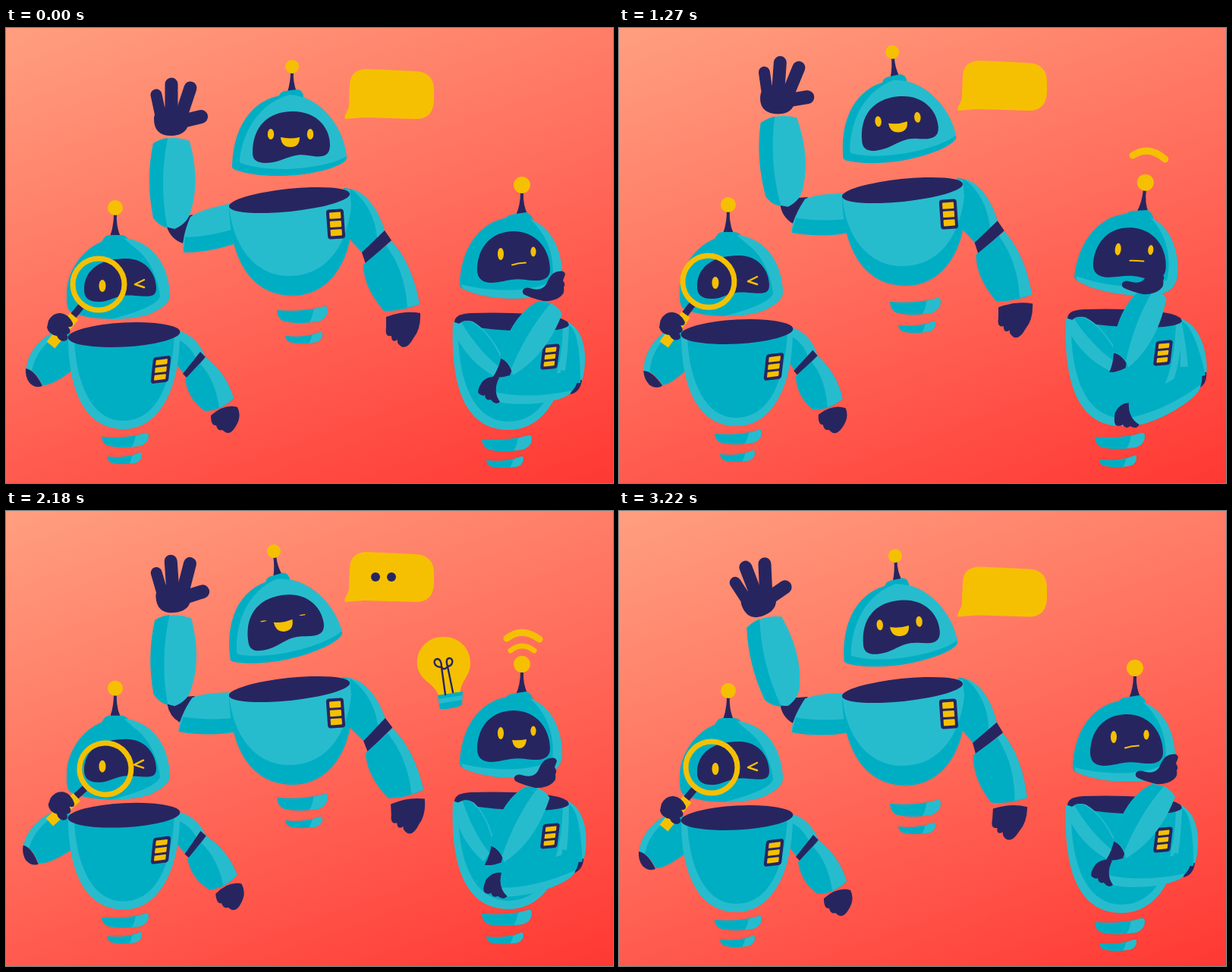
Write an HTML page that moves like this. It is 800 px wide and 600 px high and loops after 3.25 s.

```html
<!DOCTYPE html>
<html lang="en">
<head>
<meta charset="utf-8">
<title>Three robots</title>
<style>
html, body { margin: 0; width: 100%; height: 100%; overflow: hidden; }
svg { display: block; width: 800px; height: 600px; background: linear-gradient(160deg, #ff9f7f 0%, #ff6a5a 52%, #ff3833 100%); }
.l { fill: #27bccd; }
.d { fill: #00aec4; }
.n { fill: #272560; }
.y { fill: #f5c002; }
.s { fill: none; stroke: #f5c002; stroke-linecap: round; stroke-linejoin: round; }
.w { fill: none; stroke: #272560; stroke-width: 2.4; stroke-linecap: round; }
</style>
</head>
<body>
<svg id="stage" viewBox="0 0 800 600"></svg>
<script>
const LOOP = 3250;
const TIMES = [0, 750, 1270, 1590, 2180, 2760, 3220];

// markup helpers
const p = (cls, d) => `<path class="${cls}" d="${d}"/>`;
const g = (id, ...kids) => `<g id="${id}">${kids.join('')}</g>`;
const oval = (cls, x, y, rx, ry = rx, rot = 0, id = '') =>
  `<ellipse ${id && `id="${id}"`} class="${cls}" cx="${x}" cy="${y}" rx="${rx}" ry="${ry}" transform="rotate(${rot} ${x} ${y})"/>`;
const line = (id, w, d) => `<path id="${id}" class="s" stroke-width="${w}" d="${d}"/>`;

function spring(id, x, y, w, h) {
  const q = n => x + w * n;
  const end = `${q(.94)} ${y}Q${q(1.02)} ${y - 1} ${q(.99)} ${y + h * .4}Q${q(.96)} ${y + h * .75} ${q(.82)} ${y + h * .9}`;
  return g(id,
    p('d', `M${x} ${y + 5}Q${q(.5)} ${y + 8} ${end}Q${q(.42)} ${y + h * 1.12} ${q(.14)} ${y + h * .9}Q${q(.01)} ${y + h * .75} ${x} ${y + 5}Z`),
    p('l', `M${q(.72)} ${y + 4}L${end}L${q(.64)} ${y + h * .97}Q${q(.71)} ${y + h * .6} ${q(.72)} ${y + 4}Z`));
}

function badge(x, y, w, h, rot, skew = 0) {
  const bar = i => `<rect class="y" x="${x + 4}" y="${y + 4 + i * (h - 5) / 3}" width="${w - 8}" height="${(h - 14) / 3}" rx="1"/>`;
  const cx = x + w / 2, cy = y + h / 2;
  return `<g transform="translate(${cx} ${cy}) rotate(${rot}) skewY(${skew}) translate(${-cx} ${-cy})"><rect class="n" x="${x}" y="${y}" width="${w}" height="${h}" rx="4"/>${[0, 1, 2].map(bar).join('')}</g>`;
}

function antenna(x, y, r, foot, half) {
  return p('n', `M${x - 2} ${y + r - 2}h4Q${x + 1} ${foot - 11} ${x + half} ${foot + 2}H${x - half}Q${x - 2} ${foot - 11} ${x - 2} ${y + r - 2}Z`) + oval('y', x, y, r);
}

const finger = (x1, y1, x2, y2, w) =>
  `<path d="M${x1} ${y1}L${x2} ${y2}" stroke="#272560" stroke-width="${w}" stroke-linecap="round"/>`;

const waver = [
  spring('a1', 357, 367, 67, 22),
  spring('a2', 368, 401, 49, 15),
  g('aBody',
    g('aUpper',
      p('n', 'M210 256L246 246Q240 264 233 284Q215 278 210 256Z'),
      p('l', 'M310 229C275 235 255 241 243 249C236 265 231 285 234 296C258 296 287 291 310 281Z'),
      p('d', 'M236 276C262 275 287 270 310 262L310 281C287 291 258 296 234 296Z'),
      g('aFore',
        p('l', 'M194 152Q216 140 242 149Q256 200 244 240Q240 258 222 265Q204 262 194 250Q184 200 194 152Z'),
        p('d', 'M194 152Q204 146 213 145Q201 205 213 264Q200 260 194 250Q184 200 194 152Z'),
        g('aHand',
          finger(198, 88, 204, 116, 15), finger(218, 74, 218, 110, 17),
          finger(243, 79, 232, 112, 17), finger(257, 117, 232, 123, 18),
          p('n', 'M195 120C195 98 240 98 241 119C242 135 232 142 217 142C203 142 195 135 195 120Z')))),
    g('aArm',
      p('d', 'M445 211C472 212 490 238 499 267L470 297L445 270Z'),
      p('l', 'M454 212C474 216 490 238 499 267L489 277C487 250 474 226 454 212Z'),
      p('n', 'M499 267L508 280L474 311L469 296Z'),
      p('d', 'M508 281Q535 310 545 364Q522 374 498 373Q471 342 471 312Z'),
      p('l', 'M508 281Q535 310 545 364L529 369Q526 320 501 287Z'),
      p('n', 'M501 381Q524 372 546 376Q547 397 537 409Q529 424 521 420Q515 416 516 411Q508 416 508 406Q499 408 501 395Z')),
    p('d', 'M294 232C294 300 320 353 378 353C430 353 458 300 456 245L453 213Z'),
    p('l', 'M294 232C298 290 330 327 373 327C420 327 449 290 455 235L453 213Z'),
    oval('n', 373.5, 227, 80, 15, -6),
    badge(423, 239, 23, 39, -4)),
  g('aHead',
    antenna(377, 51, 9, 82, 6),
    p('d', 'M359 93Q360 84 368 83L384 81Q392 82 392 92Z'),
    p('d', 'M298 181C300 122 332 88 374 88C414 90 445 130 449 171C449 176 440 181 425 186C380 199 330 197 302 187Q297 185 298 181Z'),
    p('l', 'M308 173C313 133 336 98 374 88C414 90 445 130 449 169C424 185 350 193 309 178Q307 176 308 173Z'),
    p('n', 'M325 165C325 130 345 110 378 110C410 110 427 132 427 154C427 171 415 171 398 168C375 164 365 178 342 178C330 178 325 173 325 165Z'),
    oval('y', 349, 140, 4.2, 7, 0, 'aEyeL'),
    oval('y', 401, 140, 4.2, 7, 0, 'aEyeR'),
    g('aMouth', p('y', 'M362 144Q374 147 387 144Q387 157 375 157Q363 157 362 144Z'))),
  g('bubble',
    p('y', 'M453 76Q453 55 475 54L541 57Q564 59 564 82V96Q563 120 540 120L472 118Q458 119 447 120Q445 117 449 111Q453 104 452 98Z'),
    ...[487, 508, 529].map((x, i) => oval('n', x, 87, 6, 6, 0, 'dot' + i)))
];

const seeker = [
  spring('b1', 126, 534, 62, 19),
  spring('b2', 133, 560, 46, 15),
  g('bBody',
    g('bArmL',
      p('d', 'M62 402C40 412 27 435 27 450Q38 450 48 471Q62 472 92 448L92 412L80 398Z'),
      p('l', 'M62 402C40 412 27 435 27 450L34 452C38 432 50 416 66 406Z'),
      p('n', 'M26 449Q38 451 48 472Q39 476 31 468Q25 460 26 449Z')),
    g('bArmR',
      p('l', 'M222 398C243 402 255 415 262 432L236 458L222 440Z'),
      p('d', 'M224 410C240 416 248 428 252 441L236 458L222 440Z'),
      p('n', 'M256 427L263 434L239 462L233 456Z'),
      p('d', 'M263 434Q290 455 300 488Q284 505 262 505Q240 490 236 463Z'),
      p('l', 'M263 434Q290 455 300 488Q292 496 281 501Q276 464 256 443Z'),
      p('n', 'M270 511Q288 495 305 500Q311 512 303 525Q296 537 289 533L285 530Q279 532 277 524Q270 525 270 511Z')),
    p('l', 'M82 408C82 480 105 529 155 529C205 529 230 470 229 400Z'),
    p('d', 'M90 410C92 470 114 518 154 518C198 518 219 470 222 403Z'),
    oval('n', 155.5, 404.5, 74, 16, -3),
    badge(192.5, 433, 23, 35, 6, -13)),
  g('bHead',
    antenna(144, 237, 10, 273, 7),
    p('d', 'M126 284Q128 274 136 273H152Q161 273 162 284Z'),
    p('d', 'M80 350C80 315 110 278 148 277C190 277 214 315 216 352C216 362 205 370 190 377C165 386 110 387 85 374Q79 370 80 350Z'),
    p('l', 'M155 277C195 281 215 315 216 352C216 362 205 370 190 377C175 382 155 384 138 384C170 376 200 365 203 354C200 325 185 300 170 290Z'),
    p('n', 'M103 345C103 318 125 304 158 304C185 304 198 325 198 343C198 356 188 354 170 353C145 350 140 361 122 361C108 361 103 355 103 345Z'),
    oval('y', 127, 340, 4.5, 8),
    line('wink', 2.5, 'M182 332L170 338L182 342')),
  g('tool',
    '<path d="M99 367L84 385" stroke="#272560" stroke-width="9"/>',
    '<path d="M90 380L59 418" stroke="#f5c002" stroke-width="14"/>',
    '<circle class="s" stroke-width="7" cx="122" cy="338" r="34"/>',
    p('n', 'M56 386Q62 375 72 376Q82 377 88 389Q89 395 82 394Q88 402 80 404Q84 412 76 413Q70 413 67 406Q56 404 54 395Z'))
];

const thinker = [
  spring('c1', 627, 537, 66, 21),
  spring('c2', 633, 565, 49, 15),
  g('cBody',
    g('cArmR',
      p('d', 'M735 392L757 470L690 475Z'),
      p('l', 'M732 384Q760 392 763 430Q764 455 757 470L732 472Z'),
      p('n', 'M744 468L759 464Q757 480 744 483Z')),
    p('l', 'M589 388C585 482 610 530 662 530C716 530 742 470 742 390Z'),
    p('d', 'M596 390C594 468 618 519 662 519C708 519 733 470 734 390Z'),
    p('n', 'M591 388Q591 377 612 376Q690 374 728 382Q742 386 742 392Q735 400 690 400Q620 398 591 388Z'),
    badge(706, 417, 22, 33, 7, -12),
    g('cArmRFront',
      p('d', 'M742 392Q757 400 757 468L728 470Z'),
      p('l', 'M742 392Q734 420 727 450L737 452Q741 425 742 392Z'),
      g('cFore',
        p('d', 'M753 466Q748 490 700 495Q665 498 646 492Q640 475 650 456Q700 462 745 452Z'),
        p('l', 'M746 478Q742 490 700 495Q665 498 646 492L644 480Q690 490 746 478Z'),
        p('n', 'M650 461Q638 457 628 466Q620 478 623 482Q628 486 631 484Q632 492 639 490Q645 498 651 493Q641 479 650 461Z'))),
    g('cUpper',
      p('l', 'M590 400Q598 382 615 387Q638 400 655 436L645 460Q608 440 590 400Z'),
      p('d', 'M600 388Q606 384 614 388Q638 402 653 437L650 447Q622 425 600 388Z'))),
  g('cHead',
    antenna(680, 207, 11, 245, 8),
    p('d', 'M656 257Q658 248 666 246L686 243Q694 246 695 256Z'),
    p('d', 'M598 336C600 290 625 250 672 249C712 250 733 290 733 325C733 340 725 348 712 352C680 360 630 358 602 344Q597 341 598 336Z'),
    p('l', 'M690 252C720 262 733 295 733 325C733 340 725 348 712 352C680 360 630 358 602 344L600 338C640 349 700 349 720 332C724 300 712 270 690 252Z'),
    p('n', 'M621 318C622 288 640 268 670 268C702 269 717 295 717 318C717 335 700 334 685 332C665 329 655 336 638 336C625 335 621 328 621 318Z'),
    oval('y', 652, 298, 4, 8, 0, 'cEyeL'),
    oval('y', 695, 295, 3.6, 6.5, 0, 'cEyeR'),
    line('cLine', 2, ''),
    g('cSmile', p('y', 'M667 307Q676 308 686 306Q685 318 676 318Q669 318 667 307Z')),
    line('arc0', 7, 'M665 189Q680 177 696 189'),
    line('arc1', 9, 'M660 173Q680 157 703 174')),
  g('cArmL',
    p('n', 'M653 432L670 442L664 458Q652 462 642 460Q650 448 653 432Z'),
    p('l', 'M651 435C658 402 680 369 703 360Q725 361 733 377C721 408 702 438 668 458Q664 440 651 435Z'),
    p('d', 'M651 435C658 402 680 369 703 360L718 363C696 388 678 420 666 449Q661 438 651 435Z')),
  g('cHand',
    p('n', 'M681 346Q684 340 694 344Q706 347 712 338Q718 322 728 321Q736 319 737 325L734 333Q738 338 735 342Q737 349 731 354Q722 361 708 360Q692 356 684 352Q680 350 681 346Z')),
  g('bulb',
    p('y', 'M542 201C540 180 556 164 576 164C597 163 613 180 612 200C611 217 599 223 599 237L570 241C565 225 544 222 542 201Z'),
    p('d', 'M569 241L602 236L601 254Q588 260 572 259Z'),
    p('l', 'M570 246L602 241L601 247L571 252Z'),
    p('w', 'M579 240L574 204C563 204 562 193 569 193C574 194 574 202 574 204Q578 209 582 203C590 202 590 192 584 192C579 193 581 200 582 203L589 237'))
];

document.getElementById('stage').innerHTML = [...waver, ...seeker, ...thinker].join('');
const parts = {};
document.querySelectorAll('[id]').forEach(e => parts[e.id] = e);

// smooth curve through one value per entry of TIMES, without overshoot
function track(...v) {
  const n = v.length;
  const dt = i => TIMES[i + 1] - TIMES[i];
  const rate = i => (v[i + 1] - v[i]) / dt(i);
  const slope = v.map((_, i) => {
    if (i === 0) return rate(0) * .8;
    if (i === n - 1) return rate(n - 2) * .8;
    const a = rate(i - 1), b = rate(i);
    return a * b > 0 ? 2 * a * b / (a + b) : 0;
  });
  return t => {
    if (t >= TIMES[n - 1]) return v[n - 1];
    let i = 0;
    while (t >= TIMES[i + 1]) i++;
    const h = dt(i), u = (t - TIMES[i]) / h, w = 1 - u;
    return w * w * ((1 + 2 * u) * v[i] + u * h * slope[i]) + u * u * ((3 - 2 * u) * v[i + 1] - w * h * slope[i + 1]);
  };
}

const K = {
  aY: track(0, -7, -13, -9, 8, 16, 9),
  a1: track(0, -3, -11, -10, 6, 18, 14),
  a2: track(0, -7, -14, -13, 2, 14, 10),
  aHeadX: track(0, -1.5, -3.5, -1, -4, .5, -2),
  aHeadY: track(0, -13.5, -19.5, -16, 1, 10, 8),
  aHeadR: track(0, -2.3, -6, -2.6, -9, 1, -5),
  aUpper: track(0, 13, 11, 0, 11, 11, 11),
  aFore: track(0, 5, -4, 0, 1, -14, -14),
  aHand: track(0, -11, 4, 0, -4, -21, -21),
  aArm: track(0, 3.8, .4, -1.8, -2.7, 1.2, 3.5),
  aMouth: track(1, .42, 1, 1, 1.1, 1, 1),
  bubble: track(0, 2.5, -11, -15, 0, 19.5, 19.5),
  b2: track(0, -1, -3, -4, -4.5, -2, 0),
  bArmL: track(0, -10, -8, -1.5, 5, 3, 0),
  bArmR: track(0, 5.3, 4.4, .8, -4, -2, 0),
  toolX: track(0, -2, -1, 1, 1.5, .5, 0),
  toolY: track(0, 1.5, -1, -4, -6, -3, 0),
  toolR: track(0, -5, -3, 7, 8, 3, 0),
  winkX: track(0, 0, 0, -1, -1, 0, 0),
  cY: track(0, -2.5, -5, -6, -5, -1.2, 0),
  c1: track(0, 2, -3, -8, -11, -5, 0),
  c2: track(0, 3, -1, -5, -9, -5, 0),
  cHead: track(0, -4.5, 5.2, 0, 0, 0, 0),
  cUpper: track(0, 7, -3, 12.5, 13, 0, 0),
  cElbowX: track(0, -7, 2, -12, -12, 0, 0),
  cElbowY: track(0, 4, -8, 4, 6, -1, 0),
  cFore: track(0, 0, -10, -3.5, -3.5, 0, 0),
  cHandX: track(0, -3, -18, -11, -11, 0, 0),
  cHandY: track(0, 5, -9, 4, 5, -1.5, 0),
  cArmR: track(0, 0, -13, 0, -2, 0, 0),
  cLow: track(0, 1, -24, -6.5, -12, .5, 0),
  lineW: track(9, 5, 9, 9, 9, 9, 9),
  lineC: track(-1.5, 0, -.5, 3, 3, 4, -1.5),
  lineTilt: track(-1.5, 0, -.5, 0, 0, 0, -1.5),
  lineX: track(0, -5, 2, 0, 0, -1, 0)
};

const clamp = x => Math.max(0, Math.min(1, x));
const ramp = (x, a, b) => clamp((x - a) / (b - a));
const windowed = (t, a, b, fade) => ramp(t, a, a + fade) * (1 - ramp(t, b - fade, b));
const blink = (t, c) => ramp(Math.abs(t - c), 20, 130);

function move(id, x, y, rot = 0, px = 0, py = 0) {
  parts[id].setAttribute('transform', `translate(${x} ${y}) rotate(${rot} ${px} ${py})`);
}
function squash(id, px, py, sx, sy) {
  parts[id].setAttribute('transform', `translate(${px} ${py}) scale(${sx} ${sy}) translate(${-px} ${-py})`);
}
const fade = (id, o) => parts[id].setAttribute('opacity', o);

function drawWaver(k, t) {
  move('a1', 0, k.a1);
  move('a2', 0, k.a2);
  move('aBody', 0, k.aY);
  move('aUpper', 0, 0, k.aUpper, 300, 256);
  move('aFore', 0, 0, k.aFore - k.aUpper, 217, 262);
  move('aHand', 0, 0, k.aHand - k.aFore, 217, 125);
  move('aArm', 0, 0, k.aArm, 455, 250);
  move('aHead', k.aHeadX, k.aHeadY, k.aHeadR, 373, 178);
  const open = Math.max(.1, Math.min(blink(t, 750), blink(t, 2180)));
  squash('aEyeL', 349, 140, 1, open);
  squash('aEyeR', 401, 140, 1, open);
  squash('aMouth', 374, 149, 1, k.aMouth);
  move('bubble', 0, k.bubble);
  const f = ((t - 750) / 660 + 2.1) % 1;
  fade('dot0', ramp(f, .04, .14) * (1 - ramp(f, .27, .45)));
  fade('dot1', ramp(f, .09, .24) * (1 - ramp(f, .42, .58)));
  fade('dot2', ramp(f, .28, .43) * (1 - ramp(f, .58, .74)));
}

function drawSeeker(k, t) {
  const y = -2.25 * (1 - Math.cos(2 * Math.PI * t / LOOP));
  for (const id of ['b1', 'bBody', 'bHead']) move(id, 0, y);
  move('b2', 0, k.b2);
  move('bArmL', 0, 0, k.bArmL, 80, 408);
  move('bArmR', 0, 0, k.bArmR, 232, 420);
  move('tool', k.toolX, k.toolY, k.toolR, 69, 395);
  move('wink', k.winkX, 0);
}

function drawThinker(k, t) {
  move('c1', 0, k.c1);
  move('c2', 0, k.c2);
  move('cBody', 0, k.cY);
  move('cArmR', 0, 0, k.cArmR, 742, 395);
  move('cArmRFront', 0, 0, k.cArmR, 742, 395);
  move('cFore', 0, 0, k.cLow - k.cArmR, 752, 470);
  move('cUpper', 0, 0, k.cUpper, 605, 395);
  move('cArmL', k.cElbowX, k.cElbowY, k.cFore, 655, 448);
  move('cHand', k.cHandX, k.cHandY);
  move('cHead', 0, k.cY, k.cHead, 668, 360);
  const open = Math.max(.15, blink(t, 750));
  squash('cEyeL', 652, 298, 1, open);
  squash('cEyeR', 695, 295, 1, open);
  const smile = windowed(t, 1400, 2650, 130);
  squash('cSmile', 676, 308, .5 + smile / 2, smile);
  fade('cLine', smile > .3 ? 0 : 1);
  const x = 676 + k.lineX, w = k.lineW, s = k.lineTilt;
  parts.cLine.setAttribute('d', `M${x - w} ${311 - s}Q${x} ${311 + k.lineC} ${x + w} ${311 + s}`);
  fade('arc0', Math.max(windowed(t, 520, 1120, 80), windowed(t, 1960, 2420, 80)));
  fade('arc1', Math.max(windowed(t, 620, 1400, 80), windowed(t, 2060, 2540, 80)));
  const pop = windowed(t, 1370, 2620, 150);
  parts.bulb.setAttribute('transform', `translate(586 ${256 + 2 * ramp(t, 1590, 2180)}) scale(${pop}) translate(-586 -256)`);
}

function frame(now) {
  const t = now % LOOP;
  const k = {};
  for (const name in K) k[name] = K[name](t);
  drawWaver(k, t);
  drawSeeker(k, t);
  drawThinker(k, t);
}

const start = performance.now();
function tick() {
  frame(performance.now() - start);
  requestAnimationFrame(tick);
}
tick();
</script>
</body>
</html>
```
